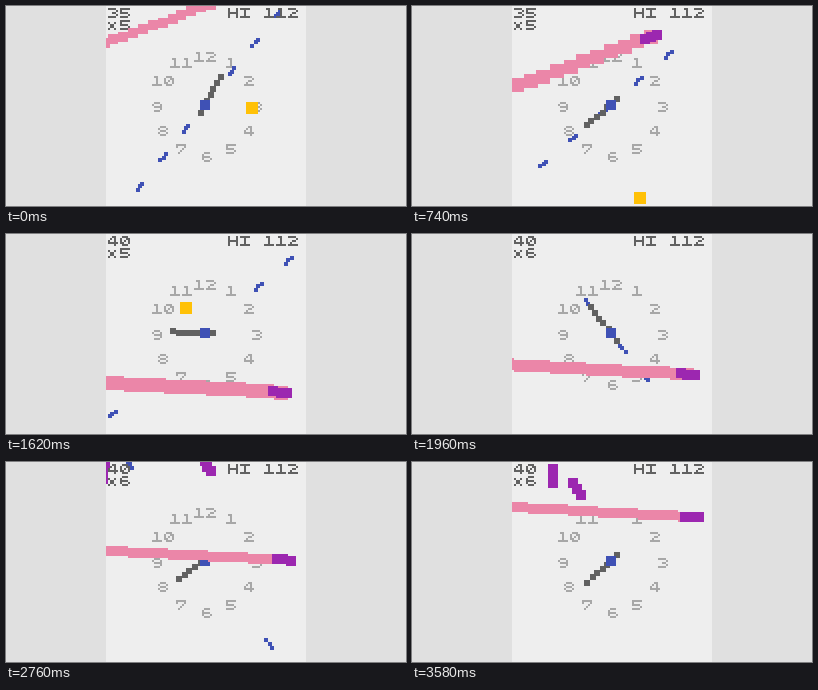
An HTML page with a canvas that plays this animation: 400 by 200 pixels, repeating every 3.6 s.

```html
<!DOCTYPE html>
<html lang="en">
<head>
<meta charset="utf-8">
<title>Clock shooter</title>
<style>
  html, body { margin: 0; width: 100%; height: 100%; overflow: hidden; background: #e0e0e0; }
  canvas { position: absolute; left: 100px; top: 0; width: 200px; height: 200px; image-rendering: pixelated; }
</style>
</head>
<body>
<canvas id="view" width="100" height="100"></canvas>
<script>
const ctx = document.getElementById('view').getContext('2d');
const LOOP = 3600, TICK = 20, CENTER = 50;
const COLOR = {
  back: '#eeeeee', ink: '#616161', dim: '#a7a7a7', blue: '#3f51b5',
  purple: '#9c27b0', pink: '#eb86a8', red: '#e91e63', gold: '#ffc107'
};

// Each glyph is one pen stroke on a 5 x 5 grid, given as "xy" corners.
const GLYPHS = {
  0: '13 31 41 43 34 14 03 01 10 30 41',
  1: '10 20 24 04 44',
  2: '00 30 41 32 22 13 04 44',
  3: '00 30 41 32 22 32 43 34 04',
  4: '34 30 20 02 03 43',
  5: '40 00 02 32 43 34 04',
  6: '30 10 01 03 14 34 43 32 02',
  7: '01 00 40 41 23 14',
  8: '12 01 10 30 41 32 12 03 14 34 43 32',
  9: '42 12 01 10 30 41 43 34 14',
  H: '00 04 02 42 40 44',
  I: '00 40 20 24 04 44',
  x: '01 34 12 22 31 04'
};

// Time and angle of the hand: it halts while firing and turns back afterwards.
const HAND = [[0, 299], [462, 140], [1498, 140], [1765, 232], [2507, 232], [3180, 0.5], [3600, 145]];

// Two opposite streams; "fore" and "aft" are one firing time of each.
const BURSTS = [
  { angle: -51.3, from: -400, to: -29, fore: -107, aft: -70, gap: 104, speed: 0.178 },
  { angle: -41.1, from: 462, to: 1498, fore: 649, aft: 612, gap: 112, speed: 0.176 },
  { angle: 232.3, from: 1765, to: 2507, fore: 2193, aft: 2244, gap: 109, speed: 0.1675 },
  { angle: 0.5, from: 3175, to: 3190, fore: 3180, aft: 3230, gap: 109, speed: 0.176 }
];

const KILL = 1080, CATCH = 1694, SHOOT = 2210, CHARGE = 1070;
const ENEMIES = [
  { x: 70, y: 16, at: 740, face: 160, move: 70, speed: 0.0285, to: KILL, aim: [0] },
  { x: 88.7, y: 62.15, at: 2280, face: 183, move: 273, speed: 0.0264, to: LOOP, aim: [SHOOT - CHARGE, 2640] },
  { x: 33, y: 14, at: 3580, face: 58, move: 148, speed: 0.0264, to: LOOP, aim: [] },
  { x: 21, y: 7.5, at: 3580, face: 95, move: 5, speed: 0.0264, to: LOOP, aim: [] }
];

const COINS = [
  { x: 73.5, y: 51.5, at: 0, vx: -0.01216, vy: 0.0608, from: 0, to: 900 },
  { x: 69.5, y: 26.5, at: 1120, vx: -0.058, vy: 0.022, from: KILL, to: CATCH }
];

const rad = deg => deg * Math.PI / 180;
const polar = (x, y, deg, r) => [x + Math.cos(rad(deg)) * r, y + Math.sin(rad(deg)) * r];
const random = n => { const s = Math.sin(n * 127.1) * 43758.5453; return s - Math.floor(s); };

function box(x, y, size, color) {
  ctx.fillStyle = color;
  ctx.fillRect(Math.floor(x - size / 2), Math.floor(y - size / 2), size, size);
}

// Chain of square blocks from r0 to r1 along an angle.
function bar(x, y, deg, r0, r1, size, color) {
  const [ax, ay] = polar(x, y, deg, r0), [bx, by] = polar(x, y, deg, r1);
  const span = Math.max(Math.abs(bx - ax), Math.abs(by - ay));
  const n = Math.max(2, Math.ceil(span / size));
  for (let i = 0; i <= n; i++) box(ax + (bx - ax) * i / n, ay + (by - ay) * i / n, size, color);
}

function text(str, x, y, color) {
  ctx.fillStyle = color;
  [...str].forEach((ch, i) => {
    if (!GLYPHS[ch]) return;
    const left = Math.floor(x) + i * 6 + 1, top = Math.floor(y) + 1;
    const pts = GLYPHS[ch].split(' ').map(p => [+p[0], +p[1]]);
    for (let k = 1; k < pts.length; k++) {
      const [ax, ay] = pts[k - 1], [bx, by] = pts[k];
      const n = Math.max(Math.abs(bx - ax), Math.abs(by - ay));
      for (let s = 0; s <= n; s++) {
        ctx.fillRect(left + ax + (bx - ax) * s / n, top + ay + (by - ay) * s / n, 1, 1);
      }
    }
  });
}

function handAngle(t) {
  const i = HAND.findIndex(key => key[0] > t);
  const [t0, a0] = HAND[i - 1], [t1, a1] = HAND[i];
  return a0 + (a1 - a0) * (t - t0) / (t1 - t0);
}

function drawDial() {
  for (let i = 1; i <= 12; i++) {
    const a = i * Math.PI / 6 - Math.PI / 2, label = String(i);
    const x = CENTER + 25 * Math.cos(a) - 3 * label.length;
    text(label, x, CENTER + 25 * Math.sin(a) - 3, COLOR.dim);
  }
}

function drawStream(t, burst, deg, phase) {
  const { from, to, gap, speed } = burst;
  const start = phase - Math.floor((phase - from) / gap) * gap;
  for (let fired = start; fired <= Math.min(t, to); fired += gap) {
    const r = 2.5 + (t - fired) * speed;
    if (r < 90) bar(CENTER, CENTER, deg, r - 2, r + 2, 2, COLOR.blue);
  }
}

function place(e, t) {
  return polar(e.x, e.y, e.move, (t - e.at) * e.speed);
}

// The aiming beam swells and thins again before the shot.
function drawAim(e, t) {
  for (const start of e.aim) {
    const age = t - start;
    if (age < 0 || age >= CHARGE) continue;
    const size = Math.floor(5 + 2.55 * Math.sin(Math.PI * age / CHARGE));
    bar(...place(e, t), e.face, 0, 150, size, COLOR.pink);
  }
}

function drawEnemies(t) {
  const live = ENEMIES.filter(e => t < e.to);
  for (const e of live) drawAim(e, t);
  for (const e of live) bar(...place(e, t), e.face, -3.5, 3.5, 5, COLOR.purple);
}

function drawLaser(t) {
  const age = t - SHOOT;
  if (age < 0 || age > 240) return;
  const e = ENEMIES[1], r = age * 0.65;
  bar(...place(e, SHOOT), e.face, r - 6.5, r + 6.5, 4, COLOR.red);
}

function drawBlast(t) {
  const age = t - KILL;
  if (age < 0) return;
  const [x, y] = place(ENEMIES[0], KILL);
  for (let i = 1; i <= 14; i++) {
    if (age > 120 + 240 * random(i + 40)) continue;
    const r = age * (0.03 + 0.06 * random(i + 20));
    box(...polar(x + 1, y - 1, 360 * random(i), r), 1, COLOR.purple);
  }
}

function draw(t) {
  ctx.fillStyle = COLOR.back;
  ctx.fillRect(0, 0, 100, 100);
  drawDial();
  for (const b of BURSTS) {
    drawStream(t, b, b.angle, b.fore);
    drawStream(t, b, b.angle + 180, b.aft);
  }
  bar(CENTER, CENTER, handAngle(t), -4.5, 16, 3, COLOR.ink);
  box(CENTER, CENTER, 5, COLOR.blue);
  drawEnemies(t);
  drawLaser(t);
  drawBlast(t);
  for (const c of COINS) {
    if (t >= c.from && t < c.to) box(c.x + c.vx * (t - c.at), c.y + c.vy * (t - c.at), 6, COLOR.gold);
  }
  text(t < KILL ? '35' : '40', 0, 0, COLOR.ink);
  text(t < CATCH ? 'x5' : 'x6', 0, 6, COLOR.ink);
  text('HI 112', 60, 0, COLOR.ink);
}

const begin = performance.now();
function frame() {
  const t = (performance.now() - begin) % LOOP;
  draw(Math.floor(t / TICK) * TICK);
  requestAnimationFrame(frame);
}
frame();
</script>
</body>
</html>
```
